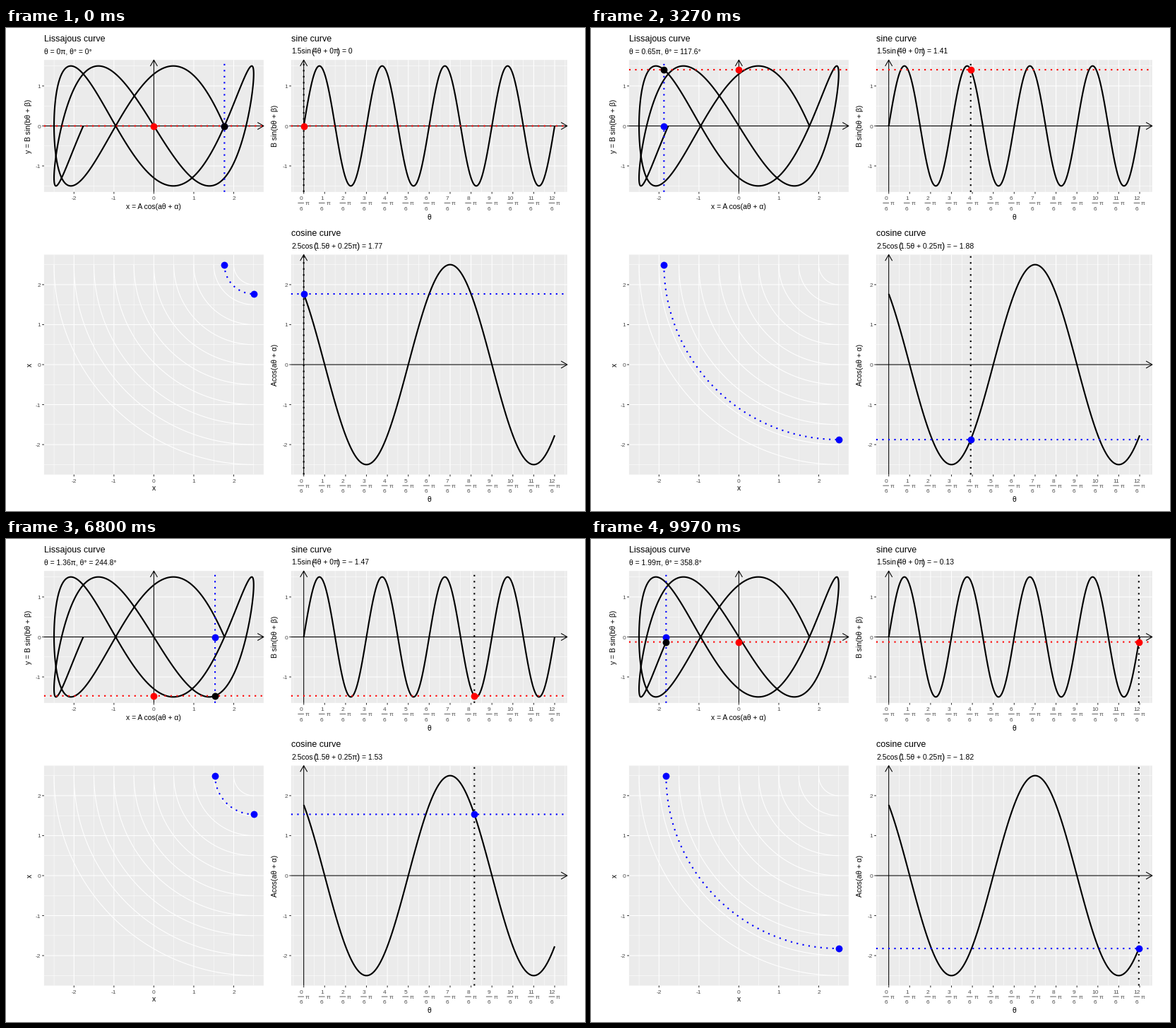
A matplotlib script for the animation above (10 s loop, 820 by 683 pixels).

```python
import numpy as np
import matplotlib.pyplot as plt
from matplotlib.animation import FuncAnimation
from matplotlib.collections import LineCollection
from matplotlib.patches import Rectangle

W, H, DPI = 820, 683, 64
PT = 72 / DPI  # points per pixel
FRAMES, LOOP_MS = 300, 10000
GREY = "#4D4D4D"
DOTTED = (0, (1, 3))
TITLE, BODY, TICK = 12.5, 10.4, 8.4

plt.rcParams["font.family"] = ["Liberation Sans", "DejaVu Sans"]
plt.rcParams["path.simplify"] = False


def wave_x(t):
    return 2.5 * np.cos(1.5 * t + 0.25 * np.pi)


def wave_y(t):
    return 1.5 * np.sin(4 * t)


class Panel:
    """Maps data coordinates to stage pixels."""

    def __init__(self, left, top, width, height, xlim, ylim):
        self.left, self.top = left, top
        self.right, self.bottom = left + width, top + height
        self.xlim, self.ylim = xlim, ylim
        self.sx = width / (xlim[1] - xlim[0])
        self.sy = height / (ylim[1] - ylim[0])

    def x(self, v):
        return self.left + (np.asarray(v) - self.xlim[0]) * self.sx

    def y(self, v):
        return self.bottom - (np.asarray(v) - self.ylim[0]) * self.sy


X_RANGE, Y_RANGE = (-2.75, 2.75), (-1.65, 1.65)
T_RANGE = (-0.1 * np.pi, 2.1 * np.pi)
curve = Panel(53.9, 45.2, 311, 186.6, X_RANGE, Y_RANGE)
sine = Panel(403.9, 45.2, 390.9, 186.6, T_RANGE, Y_RANGE)
arcs = Panel(53.9, 320.5, 311, 311, X_RANGE, X_RANGE)
cosine = Panel(403.9, 320.5, 390.9, 311, T_RANGE, X_RANGE)

fig = plt.figure(figsize=(W / DPI, H / DPI), dpi=DPI, facecolor="white")


def stage():
    ax = fig.add_axes([0, 0, 1, 1])
    ax.set(xlim=(0, W), ylim=(H, 0))
    ax.axis("off")
    return ax


def label(x, y, s, size=BODY, color="black", ha="left", va="baseline", **kw):
    return ax.text(x, y, s, fontsize=size * PT, color=color, ha=ha, va=va, **kw)


def line(x, y, color="black", width=1.07, **kw):
    return ax.plot(x, y, color=color, lw=width * PT, snap=False,
                   solid_capstyle="butt", **kw)[0]


def segments(segs, color, width):
    ax.add_collection(LineCollection(segs, colors=color, linewidths=width * PT,
                                     snap=False, zorder=2))


def grid(p, xs, ys, width):
    segments([[(p.x(v), p.top), (p.x(v), p.bottom)] for v in xs]
             + [[(p.left, p.y(v)), (p.right, p.y(v))] for v in ys], "white", width)


def panel(p, xmajor, xminor):
    ax.add_patch(Rectangle((p.left, p.top), p.right - p.left, p.bottom - p.top,
                           fc="#EBEBEB", lw=0, snap=False, zorder=1))
    n = int(p.ylim[1])
    ymajor = np.arange(-n, n + 1)
    grid(p, xminor, np.arange(-n - 0.5, n + 1), 0.53)
    grid(p, xmajor, ymajor, 1.07)
    segments([[(p.x(v), p.bottom), (p.x(v), p.bottom + 2.7)] for v in xmajor]
             + [[(p.left - 2.7, p.y(v)), (p.left, p.y(v))] for v in ymajor],
             "#333333", 1.07)
    for v in ymajor:
        label(p.left - 4.7, p.y(v) + 3, str(v), TICK, GREY, "right")


def number_panel(p):
    major = np.arange(-2, 3)
    panel(p, major, np.arange(-2.5, 3))
    for v in major:
        label(p.x(v), p.bottom + 11.2, str(v), TICK, GREY, "center")


def angle_panel(p):
    step = np.pi / 6
    panel(p, np.arange(13) * step, np.arange(-0.5, 13) * step)
    bars = []
    for k in range(13):
        x = p.x(k * step)
        mid, bar = x - 4, p.bottom + 15.6
        label(mid, p.bottom + 11.4, str(k), TICK, GREY, "center")
        label(mid, p.bottom + 25.9, "6", TICK, GREY, "center")
        label(x + 5, p.bottom + 18.4, "π", TICK, GREY, "center")
        bars.append([(mid - 4.3, bar), (mid + 4.3, bar)])
    segments(bars, GREY, 0.9)
    label((p.left + p.right) / 2, p.bottom + 39, "θ", ha="center")


def arrows(p):
    x, y = p.x(0), p.y(0)
    line([p.left, p.right], [y, y])
    line([x, x], [p.bottom, p.top])
    line([p.right - 8.7, p.right, p.right - 8.7], [y - 5, y, y + 5])
    line([x - 5, x, x + 5], [p.top + 8.7, p.top, p.top + 8.7])


def side_title(x, p, s):
    label(x, (p.top + p.bottom) / 2, s, ha="center", va="center", rotation=90)


def draw_static():
    t = np.linspace(0, 2 * np.pi, 1000)
    for p in (curve, arcs):
        number_panel(p)
    for p in (sine, cosine):
        angle_panel(p)

    quarter = np.linspace(np.pi, 1.5 * np.pi, 100)
    for r in np.arange(0.5, 5.1, 0.5):
        line(arcs.x(2.5 + r * np.cos(quarter)), arcs.y(2.5 + r * np.sin(quarter)),
             "white", 1.07)
    for p in (curve, sine, cosine):
        arrows(p)
    line(curve.x(wave_x(t)), curve.y(wave_y(t)), width=2.13)
    line(sine.x(t), sine.y(wave_y(t)), width=2.13)
    line(cosine.x(t), cosine.y(wave_x(t)), width=2.13)

    label(54, 19, "Lissajous curve", TITLE)
    label(404, 19, "sine curve", TITLE)
    label(404, 294.5, "cosine curve", TITLE)
    label(209.4, 255.5, "x = A cos(aθ + α)", ha="center")
    label(209.4, 654, "x", ha="center")
    side_title(32, curve, "y = B sin(bθ + β)")
    side_title(381, sine, "B sin(bθ + β)")
    side_title(34, arcs, "x")
    side_title(381, cosine, "Acos(aθ + α)")

    formulas = (("1.5sin", "4θ + 0π", 36.5, 432, 473.5),
                ("2.5cos", "1.5θ + 0.25π", 312, 435, 501))
    for name, inner, y, opening, closing in formulas:
        label(404, y, name)
        label(opening, y + 0.4, "(", 12.5)
        label((opening + closing) / 2, y, inner, ha="center")
        label(closing, y + 0.4, ")", 12.5, ha="right")


# Render the fixed parts once and reuse them as a backdrop.
ax = stage()
draw_static()
fig.canvas.draw()
backdrop = np.array(fig.canvas.buffer_rgba())
fig.clear()
ax = stage()
ax.imshow(backdrop, extent=(0, W, H, 0), aspect="auto", interpolation="nearest")


def dots(color):
    return line([], [], color, 2.13, linestyle=DOTTED, dash_capstyle="butt")


def ball(color):
    return ax.plot([], [], "o", color=color, ms=9.8 * PT, mew=0, snap=False)[0]


rows = [(p, dots("red")) for p in (curve, sine)] + [(cosine, dots("blue"))]
cols = [(p, dots("black")) for p in (sine, cosine)] + [(curve, dots("blue"))]
arc = dots("blue")
blue_balls, red_balls, pen = ball("blue"), ball("red"), ball("black")
angle_text = label(54, 36.5, "")
sine_text = label(476.3, 36.5, "")
cosine_text = label(503.8, 312, "")


def short(v, digits=2):
    return f"{round(float(v), digits) + 0.0:g}"


def result(v):
    return "= " + short(v).replace("-", "− ")


def update(i):
    t = 2 * np.pi * i / FRAMES
    x, y = wave_x(t), wave_y(t)

    for p, artist in rows:
        level = p.y(x if p is cosine else y)
        artist.set_data([p.left, p.right], [level, level])
    for p, artist in cols:
        at = p.x(x if p is curve else t)
        artist.set_data([at, at], [p.bottom, p.top])

    r = 2.5 - x
    a = np.linspace(np.pi, 1.5 * np.pi, 100)
    arc.set_data(arcs.x(2.5 + r * np.cos(a)), arcs.y(2.5 + r * np.sin(a)))

    blue_balls.set_data([curve.x(x), arcs.x(x), arcs.x(2.5), cosine.x(t)],
                        [curve.y(0), arcs.y(2.5), arcs.y(x), cosine.y(x)])
    red_balls.set_data([curve.x(0), sine.x(t)], [curve.y(y), sine.y(y)])
    pen.set_data([curve.x(x)], [curve.y(y)])

    angle_text.set_text(f"θ = {short(2 * i / FRAMES)}π, "
                        f"θ° = {short(360 * i / FRAMES, 1)}°")
    sine_text.set_text(result(y))
    cosine_text.set_text(result(x))


anim = FuncAnimation(fig, update, frames=FRAMES, interval=LOOP_MS / FRAMES,
                     init_func=lambda: update(0), repeat=True, repeat_delay=0,
                     cache_frame_data=False)
plt.show()
```
